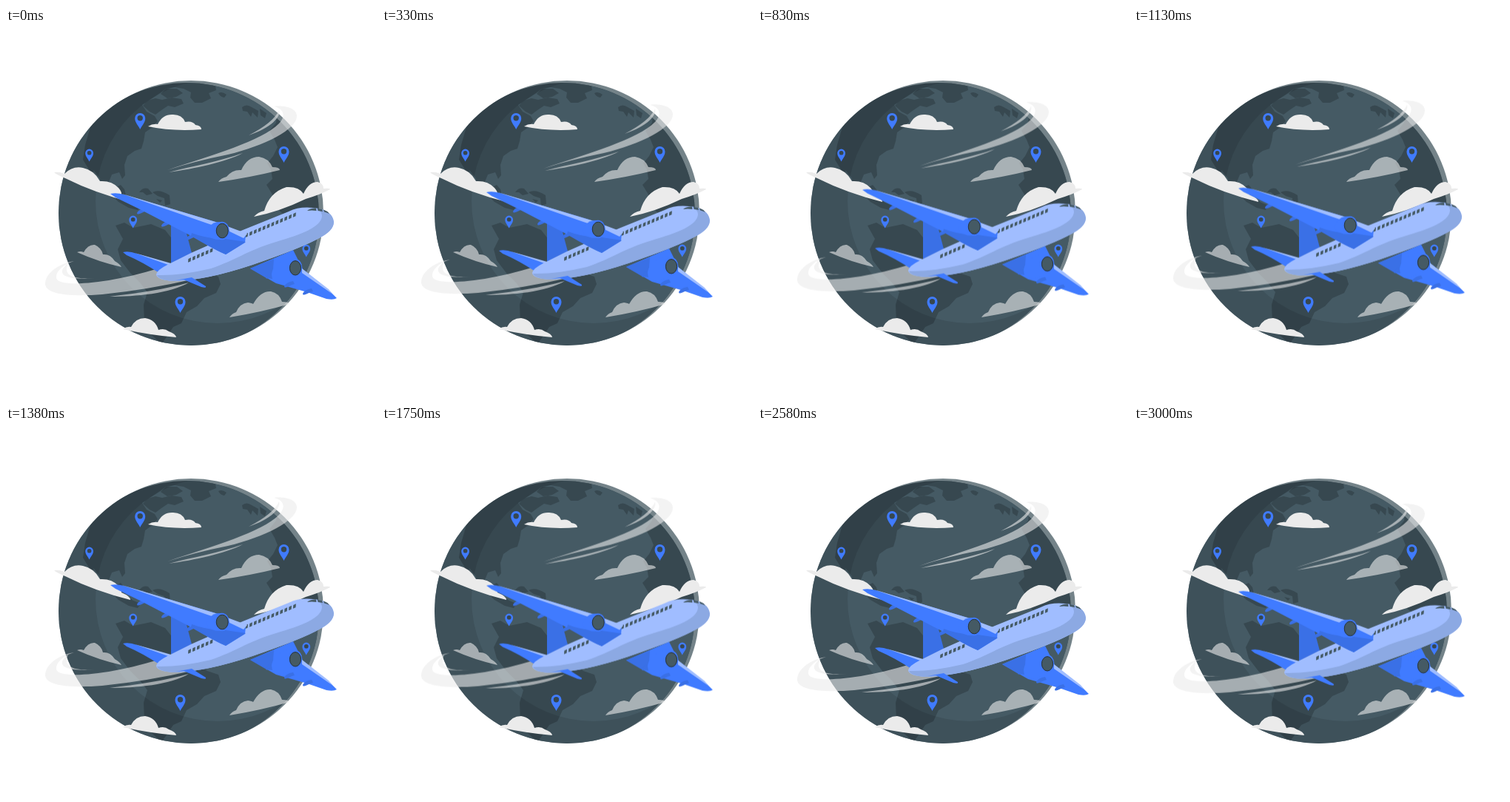
Write an HTML page that moves like this. It is 500 px wide and 500 px high and loops after 3040 ms.

```html
<!DOCTYPE html>
<html lang="en">
<head>
<meta charset="utf-8">
<title>Flight around the globe</title>
<style>
  html, body { margin: 0; width: 100%; height: 100%; overflow: hidden; background: #fff; }
  svg { display: block; width: 100vw; height: 100vh; }
  .float { animation: float 3.04s linear infinite; }
  @keyframes float { 50% { transform: translateY(-10px); } }
  .shade { fill: #000; opacity: .2; }
  .cloud { fill: #ebebeb; }
  .haze { fill: #ebebeb; opacity: .6; }
  .blue { fill: #407bff; }
  .deep { fill: #3a70e6; }
  .pale { fill: #a0bdff; }
  .dark { fill: #455a64; }
</style>
</head>
<body>
<svg viewBox="0 0 500 500">
  <defs>
    <clipPath id="disc"><circle cx="250" cy="250" r="179"/></clipPath>
    <clipPath id="face"><circle cx="244" cy="253" r="179"/></clipPath>
    <g id="pin">
      <path class="blue" d="M0 15C-2 10-7 6-7 0A7 7 0 0 1 7 0C7 6 2 10 0 15Z"/>
      <circle cy="-.3" r="3.7" fill="#37474f"/>
    </g>
    <path id="pane" class="dark" d="M-1.6-1.6L2-3.2 1.6 1.8-2 3.2Z"/>
    <path id="fairing" class="deep" d="M-6 3C-5 0 0-3 6-4L8 0C3 1-1 4-4 4.5Q-6 5-6 3Z"/>
  </defs>

  <!-- globe -->
  <circle cx="250" cy="250" r="179" fill="#748389"/>
  <g clip-path="url(#disc)">
    <g clip-path="url(#face)">
      <rect x="60" y="60" width="380" height="380" fill="#3e515a"/>
      <circle cx="286" cy="234" r="165" class="dark"/>
      <g class="shade">
        <path d="M107 158L118 120 160 88 208 70 262 70 283 78 284 84 274 88 277 95 265 101 255 101 249 94 250 87 240 82 228 80 216 82 208 88 196 96 184 104 190 113 201 119 205 126 198 134 188 141 186 153 183 163 174 166 164 173 160 185 161 199 157 204 153 195 143 198 139 208 147 216 155 212 160 218 163 230 172 236 182 240 178 246 166 243 152 235 142 225 131 216 126 202 118 192 119 207 112 191 104 178Z"/>
        <path d="M185 105L191 98 202 95 211 97 224 94 237 96 240 102 228 107 219 105 210 111 202 117 194 113Z"/>
        <path d="M209 89L216 82 231 82 239 88 230 93 218 95Z"/>
        <path d="M180 222Q185 215 192 217L198 224 190 226 185 222ZM198 222Q207 217 221 226L222 238 215 240 214 230 205 227ZM203 231L211 233 208 236ZM287 88Q292 85 298 90L295 94Q289 93 287 88ZM319 107Q325 102 332 107L341 112 340 121 333 114 331 120 326 113 320 112ZM343 109L352 115 350 122 344 118Z"/>
        <path d="M356 139L365 128 366 119 376 122 386 127 404 135 440 190 440 262 420 270 399 266 390 256 374 251 362 240 360 225 352 212 360 204 358 191 353 183 361 173 367 161 363 151Z"/>
        <path d="M148 267L160 263 172 270 196 265 215 273 226 287 239 303 254 319 272 331 287 336 290 346 284 358 268 365 258 376 244 384 237 399 226 404 216 419 210 427 197 415 187 398 186 374 191 357 181 344 168 331 155 314 151 299 158 285Z"/>
      </g>
    </g>
  </g>

  <g class="cloud">
    <path d="M192 133Q198 129 205 130Q212 116 226 117Q238 117 242 127Q252 125 256 131Q264 132 264 137Q225 140 192 133Z"/>
    <path d="M65 195Q72 194 79 197Q90 186 104 189Q119 192 127 207Q143 206 152 216Q157 222 156 225Q168 230 168 235Q120 223 80 203Q68 198 65 195Z"/>
    <path d="M335 255Q340 249 349 247Q356 222 379 215Q396 214 402 224Q409 208 421 208Q429 210 429 217Q438 216 438 218Q425 225 405 231Q370 248 335 255Z"/>
    <path d="M158 407Q163 403 169 404Q175 392 188 392Q202 394 206 408Q214 405 220 410Q229 413 230 418Q195 415 158 407Z"/>
  </g>
  <g class="haze">
    <path d="M287 208Q290 203 298 201Q306 191 318 192Q326 174 342 174Q355 176 360 188Q370 188 370 192Q330 202 287 208Z"/>
    <path d="M96 303Q101 301 105 303Q111 292 120 293Q129 297 131 306Q141 305 147 315Q154 319 156 323Q125 316 96 303Z"/>
    <path d="M302 391Q305 386 311 384Q316 372 327 371Q333 372 334 373Q344 355 358 356Q369 358 373 370Q382 370 383 373Q345 384 302 391Z"/>
  </g>

  <use href="#pin" x="181.2" y="122"/>
  <use href="#pin" x="375.5" y="167"/>
  <use href="#pin" x="235.5" y="370"/>
  <use href="#pin" transform="translate(112.6 169) scale(.77)"/>
  <use href="#pin" transform="translate(171.7 259) scale(.77)"/>
  <use href="#pin" transform="translate(405.8 298) scale(.77)"/>

  <g class="float">
    <!-- wind trails -->
    <g class="haze">
      <path d="M218 192C280 171 345 153 369 129C379 118 375 109 362 106C379 104 393 109 393 119C393 137 350 159 300 171Q255 180 218 192Z"/>
      <path d="M328 145C350 134 364 122 369 111C372 120 358 135 328 145Z"/>
      <path d="M220 195C250 187 290 180 320 169C295 182 255 190 220 195Z"/>
      <path d="M92 315C72 321 64 335 70 341C82 350 145 345 215 322L255 339Q190 354 130 360C90 363 54 361 53 346C53 331 72 318 92 315Z"/>
      <path d="M84 318C69 329 71 342 121 338C92 340 76 335 84 318Z"/>
      <path d="M140 363C180 358 215 353 247 344C222 359 175 363 140 363Z"/>
    </g>

    <!-- tail -->
    <path class="deep" d="M223 262L242 270 251 304 223 318Z"/>
    <path class="blue" d="M158 303Q166 301 177 305L229 321 207 331Q184 316 163 307Z"/>
    <path class="pale" d="M174 304L230 320 225 322Z"/>

    <!-- far-side wing -->
    <path class="blue" d="M330 325L388 300 401 326 438 356 447 365Q443 368 433 366L407 357 365 345Z"/>
    <path class="deep" d="M330 325L362 312 360 339 352 338Z"/>
    <path class="pale" d="M400 325L436 353 442 360 400 331Z"/>
    <use href="#fairing" x="357" y="334"/>
    <use href="#fairing" x="382" y="346"/>
    <use href="#fairing" x="407" y="356"/>
    <path class="blue" d="M391 312C375 309 360 320 359 333Q359 343 369 345Q382 343 392 336Z"/>
    <ellipse class="blue" cx="391" cy="324" rx="9.3" ry="12"/>
    <ellipse cx="391" cy="324.3" rx="7.6" ry="9.7" class="dark" stroke="#263238"/>

    <!-- fuselage -->
    <path class="pale" d="M203 333Q204 327 218 320L250 304 320 273 382 248Q396 241 415 243Q441 246 443 262Q443 274 423 284Q400 297 333 320Q270 341 228 342Q204 341 203 333Z"/>
    <path d="M204 334Q235 335 277 325C310 314 325 301 365 289C399 279 426 269 427 254Q427 247 417 243Q441 246 443 262Q443 274 423 284Q400 297 333 320Q270 341 228 342Q207 341 204 334Z" fill="#8ca9e3"/>
    <path class="dark" d="M407 247Q411 243 419 243.5L419.5 247Q413 246 407 247ZM421 243.7L427 245 428 248 421.5 247ZM429 245.5Q434 247 437 251Q433 249 430 248.5Z"/>
    <g id="panes"></g>

    <path class="blue" d="M229 341L251 337 270 349Q271 352 264 350L240 340Z"/>

    <!-- near-side wing -->
    <use href="#fairing" x="183" y="247"/>
    <use href="#fairing" x="216" y="264"/>
    <use href="#fairing" x="249" y="282"/>
    <path class="blue" d="M141 224Q149 222 159 225L290 264 324 279 323 290 297 306Q285 301 256 284L181 245 148 229Z"/>
    <path class="deep" d="M251 277Q272 285 290 284L324 289 297 306Q284 301 250 281Z"/>
    <path class="pale" d="M155 223.5L283 262 326 278 321 284 296 272 272 264Z"/>
    <path class="blue" d="M291 262C279 261 271 269 271 279Q278 287 292 286Z"/>
    <ellipse class="blue" cx="291.8" cy="274" rx="10" ry="12.3"/>
    <ellipse cx="292.2" cy="274" rx="8" ry="9.8" class="dark" stroke="#263238"/>
  </g>
</svg>
<script>
  const panes = document.getElementById('panes');
  function row(count, x, y, dx, dy) {
    for (let i = 0; i < count; i++) {
      const pane = document.createElementNS('http://www.w3.org/2000/svg', 'use');
      pane.setAttribute('href', '#pane');
      pane.setAttribute('x', x + i * dx);
      pane.setAttribute('y', y + i * dy);
      panes.append(pane);
    }
  }
  row(6, 248, 313.5, 5.9, -2.6);
  row(12, 325, 280, 5.9, -2.5);
</script>
</body>
</html>
```
